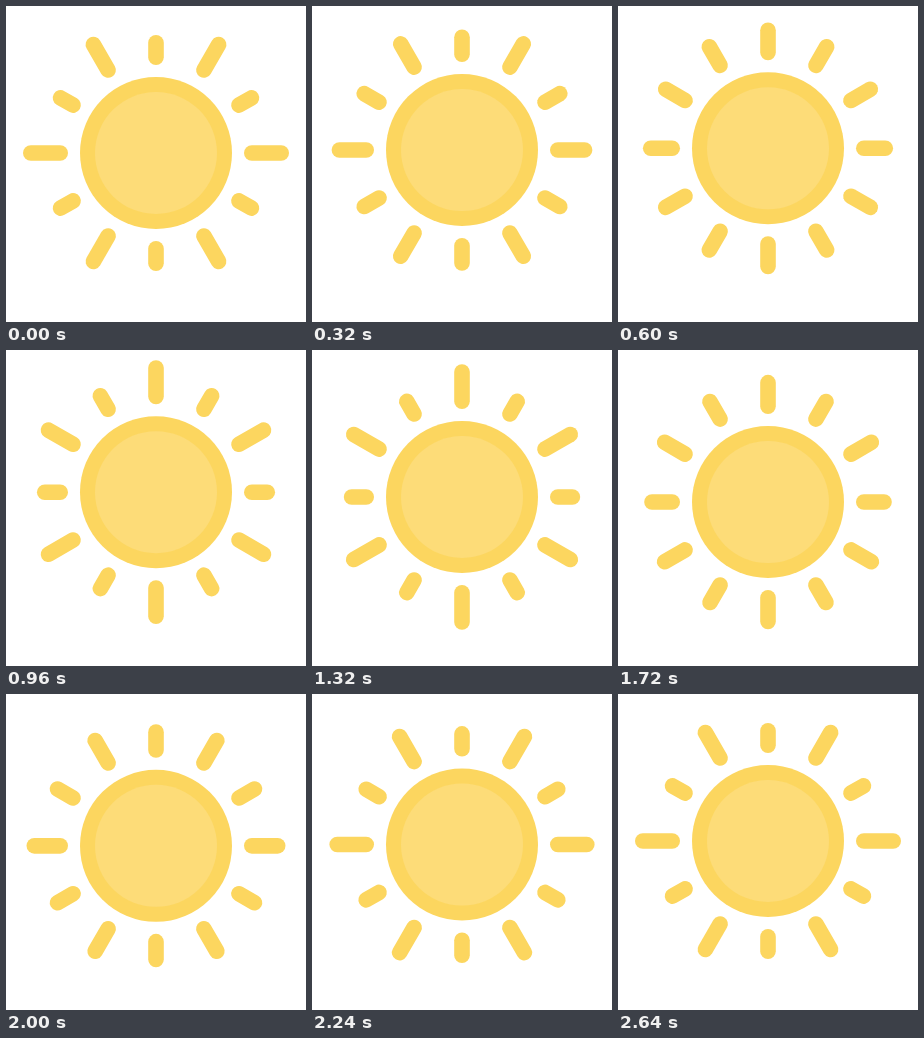
Recreate the animation shown at these times as an HTML page. Size 300 by 316 pixels, loop 2880 ms.

```html
<!DOCTYPE html>
<html lang="en">
<head>
<meta charset="utf-8">
<title>Sun</title>
<style>
  html, body { margin: 0; width: 100%; height: 100%; overflow: hidden; background: #fff; }
  svg { display: block; width: 100%; height: 100%; }
</style>
</head>
<body>
<svg viewBox="0 0 300 316">
  <g id="sun">
    <g id="rays" stroke="#fcd65f" stroke-width="15.6" stroke-linecap="round"></g>
    <circle r="76" fill="#fcd65f"/>
    <circle r="61" fill="#fddc78"/>
  </g>
</svg>
<script>
const LOOP = 2880, MOVE = 2640, STEP = 40;
const INNER = 88, SHORT = 118, LONG = 133, CAP = 7.8;
const CENTER_Y = 147, SWING = 5.2, TURN = 840;

const sun = document.getElementById('sun');
const group = document.getElementById('rays');
const rays = Array.from({ length: 12 }, (_, i) => {
  const line = document.createElementNS('http://www.w3.org/2000/svg', 'line');
  line.setAttribute('x1', INNER + CAP);
  line.setAttribute('transform', `rotate(${i * 30})`);
  group.appendChild(line);
  return line;
});

// Sine ease from 0 to 1 between two times
function ease(t, from, to) {
  const p = Math.min(1, Math.max(0, (t - from) / (to - from)));
  return (1 - Math.cos(Math.PI * p)) / 2;
}

// Rise, sink, then settle back at the middle
function offset(t) {
  if (t < TURN) return -SWING * Math.sin(Math.PI / 2 * t / TURN);
  if (t > MOVE - TURN) return SWING * Math.sin(Math.PI / 2 * (MOVE - t) / TURN);
  return SWING * (2 * ease(t, TURN, MOVE - TURN) - 1);
}

function draw(time) {
  const t = Math.min(MOVE, Math.floor((time % LOOP) / STEP) * STEP);
  const swap = ease(t, 0, 1160) - ease(t, 1240, 2360);
  const reach = (LONG - SHORT) * swap;
  sun.setAttribute('transform', `translate(150 ${CENTER_Y + offset(t)})`);
  rays.forEach((ray, i) => {
    const end = i % 2 ? SHORT + reach : LONG - reach;
    ray.setAttribute('x2', end - CAP);
  });
}

const start = performance.now();
function tick() {
  draw(performance.now() - start);
  requestAnimationFrame(tick);
}
tick();
</script>
</body>
</html>
```
